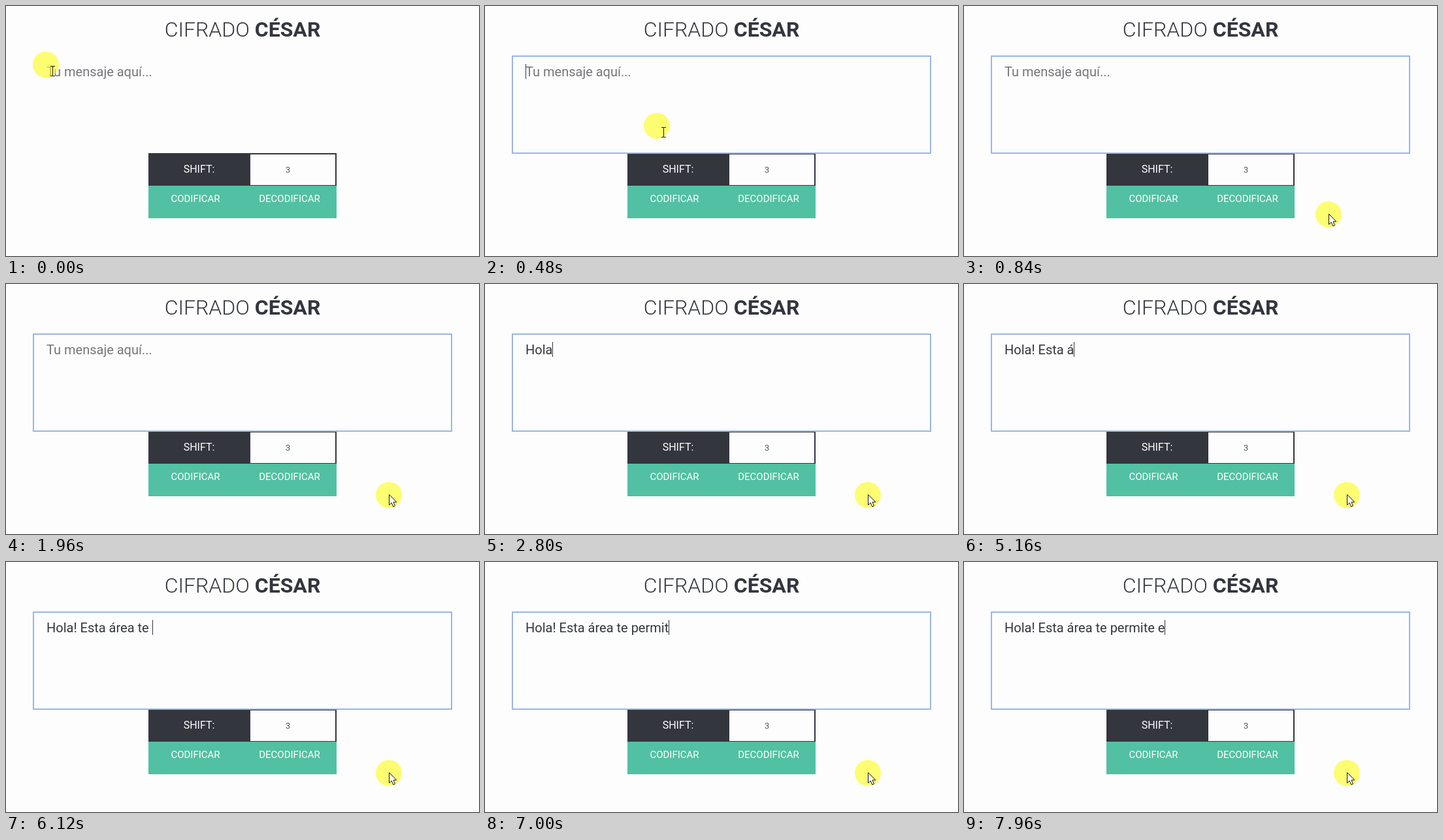
Write an HTML page with a canvas that moves like this. It is 724 by 384 pixels and loops after 8 s.

```html
<!DOCTYPE html>
<html lang="es">
<head>
<meta charset="utf-8">
<style>
  html, body { margin: 0; width: 100%; height: 100%; overflow: hidden; background: #fdfdfd; }
  canvas { display: block; }
</style>
</head>
<body>
<canvas id="stage" width="724" height="384"></canvas>
<script>
const ctx = document.getElementById('stage').getContext('2d');
const LOOP = 8000;
const CLICK = 200;
const BLINK = 500;
const KEY_STEP = 145;
const INK = '#33363d';
const PAPER = '#fdfdfd';
const BURSTS = [
  { start: 2200, text: 'Hola' },
  { start: 3320, text: '! ' },
  { start: 3960, text: 'Esta ' },
  { start: 5040, text: 'área te permit' },
  { start: 7160, text: 'e ' },
  { start: 7600, text: 'e' }
];

const clamp = value => Math.min(1, Math.max(0, value));
const easeInOut = u => u * u * (3 - 2 * u);

// Eased progress from 0 to 1 between two times
const progress = (time, from, to) => easeInOut(clamp((time - from) / (to - from)));

function box(x, y, w, h, color) {
  ctx.fillStyle = color;
  ctx.fillRect(x, y, w, h);
}

function text(value, x, y, size, weight, color, align = 'left') {
  ctx.font = `${weight} ${size}px Roboto, sans-serif`;
  ctx.textAlign = align;
  ctx.fillStyle = color;
  ctx.fillText(value, x, y);
  return ctx.measureText(value).width;
}

function drawTitle() {
  ctx.font = '300 32px Roboto, sans-serif';
  const light = ctx.measureText('CIFRADO ').width;
  ctx.font = '700 32px Roboto, sans-serif';
  const bold = ctx.measureText('CÉSAR').width;
  const left = 362 - (light + bold) / 2;
  text('CIFRADO ', left, 47, 32, 300, INK);
  text('CÉSAR', left + light, 47, 32, 700, INK);
}

function drawControls() {
  box(218, 226, 288, 50, INK);
  box(374, 228, 130, 47, PAPER);
  box(218, 276, 288, 50, '#52c0a2');
  text('SHIFT:', 295.5, 256, 16, 400, '#ffffff', 'center');
  text('3', 431.5, 256, 13.33, 400, '#55575c', 'center');
  text('CODIFICAR', 290, 301, 15, 400, '#ffffff', 'center');
  text('DECODIFICAR', 434, 301, 15, 400, '#ffffff', 'center');
}

function typingAt(time) {
  let typed = '';
  let lastKey = CLICK;
  for (const burst of BURSTS) {
    if (time < burst.start) break;
    const elapsed = Math.floor((time - burst.start) / KEY_STEP);
    const count = Math.min(burst.text.length, elapsed + 1);
    typed += burst.text.slice(0, count);
    lastKey = burst.start + (count - 1) * KEY_STEP;
  }
  return { typed, lastKey };
}

function drawMessage(time) {
  const { typed, lastKey } = typingAt(time);
  const width = text(typed, 62, 108, 20, 400, INK);
  if (!typed) text('Tu mensaje aquí...', 62, 108, 20, 400, '#75767a');
  if (time < CLICK) return;

  ctx.strokeStyle = '#9ab6e3';
  ctx.lineWidth = 2;
  ctx.strokeRect(42, 77, 640, 149);
  if (Math.floor((time - lastKey) / BLINK) % 2 === 0) {
    box(Math.round(62 + width), 89, 1, 23, INK);
  }
}

function drawBeam(x, y) {
  ctx.strokeStyle = '#222222';
  ctx.lineWidth = 1;
  ctx.beginPath();
  for (const end of [-7.5, 7.5]) {
    ctx.moveTo(x - 3.5, y + end);
    ctx.lineTo(x + 3.5, y + end);
  }
  ctx.moveTo(x, y - 7.5);
  ctx.lineTo(x, y + 7.5);
  ctx.stroke();
}

function drawArrow(x, y) {
  ctx.save();
  ctx.translate(x, y);
  const arrow = new Path2D('M0 0V16L3.7 12.6L6.3 18.5L9 17.4L6.5 11.5H11.3Z');
  ctx.fillStyle = '#ffffff';
  ctx.fill(arrow);
  ctx.strokeStyle = '#111111';
  ctx.lineWidth = 1;
  ctx.stroke(arrow);
  ctx.restore();
}

function drawPointer(time) {
  const sweep = progress(time, CLICK, 840);
  const settle = progress(time, 840, 1320);
  const x = Math.round(61 + 497 * sweep + 28 * settle);
  const y = Math.round(90 + 230 * sweep + 4 * settle);
  ctx.fillStyle = 'rgba(253, 253, 30, 0.62)';
  ctx.beginPath();
  ctx.arc(x, y, 20, 0, Math.PI * 2);
  ctx.fill();
  if (y < 226) drawBeam(x + 10.5, y + 10);
  else drawArrow(x + 0.5, y - 0.5);
}

function render(now) {
  const time = now % LOOP;
  box(0, 0, 724, 384, PAPER);
  drawTitle();
  drawControls();
  drawMessage(time);
  drawPointer(time);
}

let start;
function tick(now) {
  start ??= now;
  render(now - start);
  requestAnimationFrame(tick);
}
render(0);
requestAnimationFrame(tick);
</script>
</body>
</html>
```
